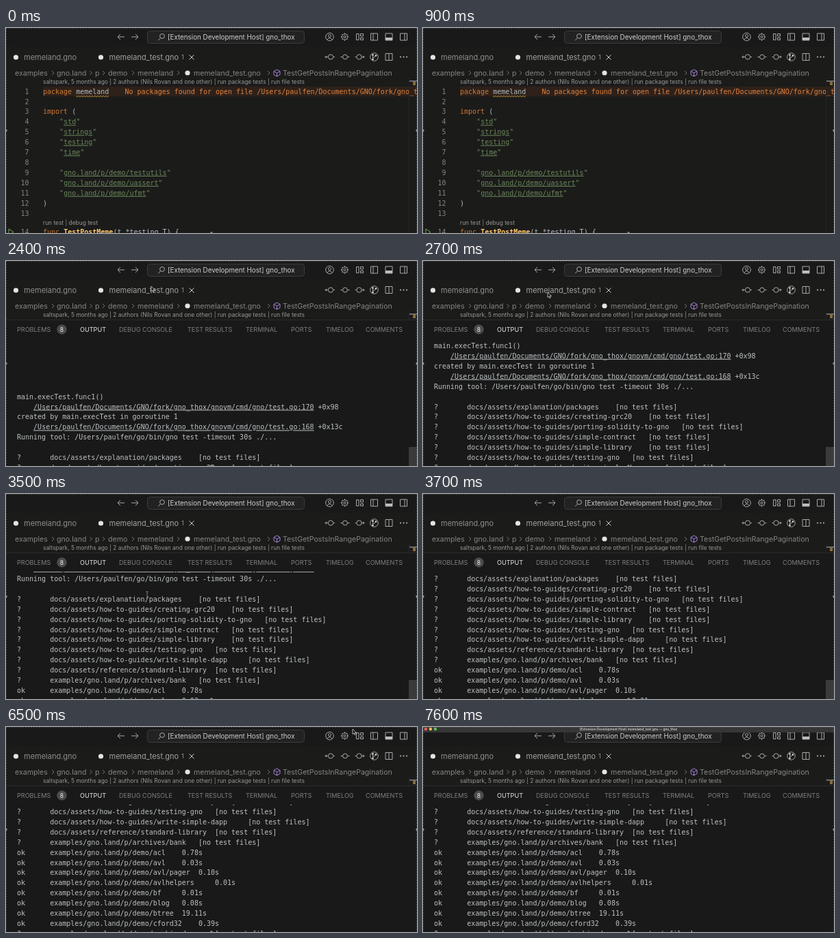
An HTML page for the animation above (8100 ms loop, 600 px wide and 301 px high).

```html
<!DOCTYPE html>
<html lang="en">
<head>
<meta charset="utf-8">
<title>Running package tests in the editor</title>
<style>
html, body { margin: 0; width: 100%; height: 100%; overflow: hidden; background: #1b1b1a; }
svg { display: block; width: 600px; height: 301px; }
text { white-space: pre; font-family: Inter, "Liberation Sans", sans-serif; }
.mono { font-family: "DejaVu Sans Mono", monospace; font-size: 10px; }
.keys { font-family: "DejaVu Sans", sans-serif; }
.u { text-decoration: underline; }
.line { fill: none; stroke: #a9a9a9; stroke-width: 1; }
.kw { fill: #cc7832; }
.str { fill: #6a8759; }

#palette, #panel, #thumb, #arrow, #beam { animation: 8100ms step-end infinite; }
#palette { animation-name: palette; }
#panel { animation-name: panel; }
#thumb { animation-name: thumb; }
#output { animation: output 8100ms step-end infinite; }
#titlebar { animation: titlebar 8100ms linear infinite; }
#arrow { animation-name: arrowShown; }
#arrow path { animation: arrowMove 8100ms linear infinite; }
#beam { animation-name: beamShown; }
#beam path { animation: beamMove 8100ms linear infinite; }

@keyframes palette { 0%, 25.9% { visibility: hidden } 12.3% { visibility: visible } 100% { visibility: hidden } }
@keyframes panel { 0% { visibility: hidden } 27.1%, 100% { visibility: visible } }
@keyframes thumb { 0% { opacity: 0 } 29.6% { opacity: 1 } 79% { opacity: .5 } 80.2%, 100% { opacity: 0 } }
@keyframes output {
  0% { transform: translateY(224px) }
  28.3% { transform: translateY(149.5px) }
  29.6% { transform: translateY(74.75px) }
  30.8% { transform: none; animation-timing-function: step-end }
  38.2% { transform: translateY(0); animation-timing-function: steps(6, end) }
  45.6% { transform: translateY(-89.7px); animation-timing-function: steps(5, end) }
  53%, 100% { transform: translateY(-164.45px) }
}
@keyframes titlebar {
  0%, 20.9% { transform: translateY(-10px) }
  22.2% { transform: none }
  23.4% { transform: translateY(-4px) }
  24.6%, 83.3% { transform: translateY(-10px) }
  86.4%, 100% { transform: none }
}
@keyframes arrowShown {
  0%, 39.4%, 84.5% { visibility: hidden }
  27.1%, 79% { visibility: visible }
  100% { visibility: hidden }
}
@keyframes arrowMove {
  0%, 27.1% { transform: translate(235px, 30px) }
  32.9%, 38.2% { transform: translate(182px, 46px) }
  39.4%, 79% { transform: translate(378px, 88px) }
  80.2%, 83.3% { transform: translate(506px, 3px) }
  86.4%, 100% { transform: translate(300px, 0) }
}
@keyframes beamShown { 0%, 79% { visibility: hidden } 39.4% { visibility: visible } 100% { visibility: hidden } }
@keyframes beamMove {
  0%, 39.4% { transform: translate(190px, 100px) }
  40.7%, 51.8% { transform: translate(206px, 148px) }
  54.3% { transform: translate(230px, 190px) }
  59.2%, 67.9% { transform: translate(244px, 216px) }
  70.3%, 72.8% { transform: translate(244px, 226px) }
  75.3%, 100% { transform: translate(378px, 90px) }
}
</style>
</head>
<body>
<svg viewBox="0 0 600 301" id="stage"></svg>
<script>
const PITCH = 14.95;

// y is the optical middle of the capitals
const text = (x, y, size, fill, str, extra = '') =>
  `<text x="${x}" y="${y + size * 0.36}" font-size="${size}" fill="${fill}" ${extra}>${str}</text>`;
const mono = (x, y, fill, str, extra = '') => text(x, y, 10, fill, str, `class="mono" ${extra}`);
const rect = (x, y, w, h, fill, extra = '') =>
  `<rect x="${x}" y="${y}" width="${w}" height="${h}" fill="${fill}" ${extra}/>`;
const dot = (x, y, r, fill) => `<circle cx="${x}" cy="${y}" r="${r}" fill="${fill}"/>`;
const ring = (x, y, r) => `<circle class="line" cx="${x}" cy="${y}" r="${r}"/>`;
const path = (d, extra = '') => `<path class="line" d="${d}" ${extra}/>`;
const span = (cls, str) => `<tspan class="${cls}">${str}</tspan>`;
const range = n => [...Array(n).keys()];

function gear(x, y) {
  const teeth = range(8).map(i => {
    const a = i * Math.PI / 4, c = Math.cos(a), s = Math.sin(a);
    return `M${x + 4 * c} ${y + 4 * s}L${x + 5.8 * c} ${y + 5.8 * s}`;
  }).join('');
  return ring(x, y, 4.1) + ring(x, y, 1.6) + path(teeth, 'stroke-width="1.7"');
}

const frameIcon = (x, y, inner) => path(`M${x - 5} ${y - 5}h10v10h-10z${inner}`);

function topBar() {
  return rect(0, 0, 600, 28, '#191919') +
    path('M173 13H163m4-4l-4 4 4 4M183 13h10m-4-4l4 4-4 4') +
    rect(206.5, 4.5, 229, 18, '#222', 'rx="4" stroke="#3c3c3c"') +
    ring(228, 12, 3.4) + path('M225.6 14.6l-3.4 3.6') +
    text(236, 13, 9.8, '#cfcfcf', '[Extension Development Host] gno_thox') +
    ring(472.5, 13, 5.8) + ring(472.5, 11.5, 2) + path('M468.8 17.2q3.7-5 7.4 0') +
    gear(494.5, 13) +
    path('M511.5 8.5h3.5v9h-3.5zM517.5 8.5h4v3.5h-4zM517.5 14.5h4v3h-4z') +
    frameIcon(537.5, 13, 'm3.5 0v10') +
    frameIcon(559, 13, '') + rect(554, 14, 10, 4, '#bdbdbd') +
    frameIcon(580.5, 13, 'm6.5 0v10');
}

function tabs() {
  return dot(14.5, 43, 3.6, '#e4e4e4') +
    text(26, 43, 11, '#8e8e8e', 'memeland.gno') +
    dot(138.5, 43, 3.6, '#e4e4e4') +
    text(150.5, 43, 11, '#a2a2a2', 'memeland_test.gno') +
    text(256, 43, 9.6, '#929292', '1') +
    path('M267.5 39.5l7 7m0-7l-7 7', 'style="stroke:#cfcfcf"') +
    ring(474, 42.5, 3.6) + path('M470 42.5h-4m2-2l-2 2 2 2M478 42.5h2') +
    ring(495, 42.5, 3.4) + path('M488.5 42.5h3m7 0h3') +
    ring(515.5, 42.5, 3.6) + path('M519 42.5h4m-2-2l2 2-2 2M509.5 42.5h2') +
    ring(537.5, 42.5, 5.8) + path('M535.5 38.5v8m0-3q4 0 4.5-4') +
    dot(535.5, 39.5, 1.3, '#ddd') + dot(540, 40.5, 1.3, '#ddd') + dot(535.5, 46, 1.3, '#ddd') +
    frameIcon(559, 42.5, 'm5 0v10') +
    [576, 580.5, 585].map(x => dot(x, 42.5, 1, '#c4c4c4')).join('');
}

function breadcrumbs() {
  const crumbs = [[13, 'examples'], [74, 'gno.land'], [130, 'p'], [149, 'demo'],
    [192, 'memeland'], [274, 'memeland_test.gno'], [404, 'TestGetPostsInRangePagination']];
  return crumbs.map(([x, s]) => text(x, 66, 10.6, '#858585', s)).join('') +
    [67, 122.5, 141, 184, 250, 382].map(x => path(`M${x} 63l3 3-3 3`, 'style="stroke:#737373"')).join('') +
    dot(265, 66, 3.6, '#e4e4e4') +
    path('M395.500 61l4.500 2.500v5l-4.500 2.500-4.500-2.500v-5zM391 63.500l4.500 2.500 4.500-2.500M395.500 66v5', 'style="stroke:#a581d6"');
}

function editor() {
  const quoted = s => `    <tspan class="str">"${span('u', s)}"</tspan>`;
  const imports = ['std', 'strings', 'testing', 'time', '',
    'gno.land/p/demo/testutils', 'gno.land/p/demo/uassert', 'gno.land/p/demo/ufmt'];
  const code = [
    span('kw', 'package') + ' memeland',
    '', span('kw', 'import') + ' (',
    ...imports.map(s => s && quoted(s)), ')', ''
  ];
  const rowY = i => 93 + i * 14.92;
  const rows = code.map((s, i) =>
    mono(33.5, rowY(i), '#858585', i + 1, 'text-anchor="end"') + mono(54, rowY(i), '#b4bcc4', s)).join('');
  const wave = 'M102 99.500' + 'l2 1.800l2-1.800'.repeat(12);
  return rect(54, 86, 546, 14.5, '#2e211a') + rows +
    path(wave, 'style="stroke:#c9a03a;stroke-width:.9"') +
    mono(173.5, 93, '#e0823e', 'No packages found for open file /Users/paulfen/Documents/GNO/fork/gno_thox') +
    text(54, 286, 8.4, '#989898', 'run test | debug test') +
    mono(33.5, 299.5, '#858585', '14', 'text-anchor="end"') +
    mono(54, 299.5, '#b4bcc4', span('kw', 'func') +
      ' <tspan fill="#ffc66d" font-weight="bold">TestPostMeme</tspan>(t *testing.T) {') +
    path('M4 295l7 4.500-7 4.500z', 'style="stroke:#6fae55"') +
    path('M588.500 74v227', 'style="stroke:#262626"');
}

function codeLens() {
  return text(54, 79, 8.4, '#989898',
    'saltspark, 5 months ago | 2 authors (Nils Rovan and one other) | run package tests | run file tests') +
    rect(589, 77, 11, 2, '#6d6d6d') + rect(594, 79, 4, 5, '#8a6a3a');
}

// Tab stops every four columns, with at least two blanks between fields
function field(status, name, result) {
  const left = status.padEnd(8) + name;
  const gap = 4 - left.length % 4;
  return left + ' '.repeat(gap === 1 ? 5 : gap) + result;
}

function outputLines() {
  const trace = (n, off) =>
    '    ' + span('u', `/Users/paulfen/Documents/GNO/fork/gno_thox/gnovm/cmd/gno/test.go:${n}`) + ' ' + off;
  const untested = [
    ...['explanation/packages', 'how-to-guides/creating-grc20', 'how-to-guides/porting-solidity-to-gno',
      'how-to-guides/simple-contract', 'how-to-guides/simple-library', 'how-to-guides/testing-gno',
      'how-to-guides/write-simple-dapp', 'reference/standard-library'].map(s => 'docs/assets/' + s),
    'examples/gno.land/p/archives/bank'
  ];
  const passed = { acl: 0.78, avl: 0.03, 'avl/pager': 0.1, avlhelpers: 0.01,
    bf: 0.01, blog: 0.08, btree: 19.11, cford32: 0.39 };
  const demo = 'examples/gno.land/p/demo/', none = '[no test files]';
  return [
    'main.execTest.func1()', trace(170, '+0x98'),
    'created by main.execTest in goroutine 1', trace(168, '+0x13c'),
    'Running tool: /Users/paulfen/go/bin/gno test -timeout 30s ./...', '',
    ...untested.map(s => field('?', s, none)),
    ...Object.entries(passed).map(([s, sec]) => field('ok', demo + s, sec.toFixed(2) + 's')),
    field('?', demo + 'combinederr', none)
  ];
}

function panel() {
  const heads = [[16, 'PROBLEMS'], [108, 'OUTPUT'], [165, 'DEBUG CONSOLE'], [265, 'TEST RESULTS'],
    [350, 'TERMINAL'], [416, 'PORTS'], [467, 'TIMELOG'], [525, 'COMMENTS']];
  const lines = outputLines().map((s, i) => mono(16, 124.2 + i * PITCH, '#bdc1c4', s)).join('');
  return rect(0, 86, 600, 215, '#191919') + rect(0, 86, 600, 1, '#2b2b2b') +
    heads.map(([x, s]) => text(x, 100.5, 9.1, s === 'OUTPUT' ? '#e6e6e6' : '#7f7f7f', s)).join('') +
    dot(81.5, 100.5, 7.2, '#4c4c4c') +
    text(81.5, 100.5, 8.6, '#f2f2f2', '8', 'text-anchor="middle"') +
    `<g clip-path="url(#outputClip)"><g id="output">${lines}</g></g>` +
    `<g id="thumb">${rect(588, 273, 12, 28, '#3a3a3a')}</g>`;
}

function palette() {
  const commands = ['Gno: Test All Packages In Workspace', 'Gno: Test Function At Cursor',
    'Gno: Test File', 'Gno: Test Package', 'Test: Run All Tests', 'Format Document',
    'Gno: Add Import', 'Extensions: Install from VSIX...', 'Preferences: File Icon Theme'];
  const rowY = i => 44 + i * 18.25;
  const keys = (row, glyphs) => [...glyphs].map((g, i) => {
    const x = 418 + i * 20.5;
    return rect(x - 7, rowY(row) - 6.5, 14, 13, '#303030', 'rx="2.500"') +
      text(x, rowY(row), 8.6, '#cfcfcf', g, 'class="keys" text-anchor="middle"');
  }).join('');
  return rect(113.5, -4, 372, 193, '#222', 'rx="5" stroke="#303030"') +
    rect(119, 12, 362, 18, '#272727', 'rx="2"') +
    text(124, 21, 10.5, '#d8d8d8', '&gt;') + rect(131.5, 15, 1, 12, '#d8d8d8') +
    '<g clip-path="url(#paletteClip)">' +
    commands.map((s, i) => text(127, rowY(i), 10.4, i ? '#898989' : '#f4f4f4', s)).join('') + '</g>' +
    text(450, 44, 10.4, '#f0f0f0', 'recently used', 'text-anchor="end"') + gear(462, 44) +
    rect(477, 34, 8.5, 18, '#383838') + keys(4, '⌘;A') + keys(5, '⇧⌥F');
}

function titleBar() {
  return rect(0, 0, 600, 8, '#363636') +
    ['#f4605a', '#f6be4f', '#61c454'].map((c, i) => dot(4 + i * 7, 3, 2.2, c)).join('') +
    text(300, 3, 4.7, '#d2d2d2', '[Extension Development Host] memeland_test.gno — gno_thox',
      'text-anchor="middle" font-weight="600"');
}

const selection =
  path('M0 .5H600M.5 0V301M599.500 0V301', 'style="stroke:#777;stroke-dasharray:2 2;stroke-opacity:.45"') +
  dot(0, 150.5, 1.7, '#999') + dot(600, 150.5, 1.7, '#999') + dot(300, 301, 1.7, '#999');

const clip = (id, x, y, w, h) => `<clipPath id="${id}">${rect(x, y, w, h, '#fff')}</clipPath>`;
const group = (id, content) => `<g id="${id}">${content}</g>`;

document.getElementById('stage').innerHTML =
  `<defs>${clip('outputClip', 0, 114, 588, 187)}${clip('paletteClip', 114, 34, 372, 154.5)}</defs>` +
  rect(0, 0, 600, 301, '#1b1b1a') + topBar() + tabs() + breadcrumbs() + editor() + codeLens() +
  group('panel', panel()) + group('palette', palette()) + group('titlebar', titleBar()) + selection +
  group('arrow', '<path d="M0 0v7.500l1.800-1.600 1.200 2.700 1.300-.6-1.200-2.600h2.400z" fill="#111" stroke="#eee" stroke-width=".7"/>') +
  group('beam', '<path d="M-1.500-4.500h3M0-4.500v9M-1.500 4.500h3" fill="none" stroke="#999" stroke-width=".8"/>');
</script>
</body>
</html>
```
